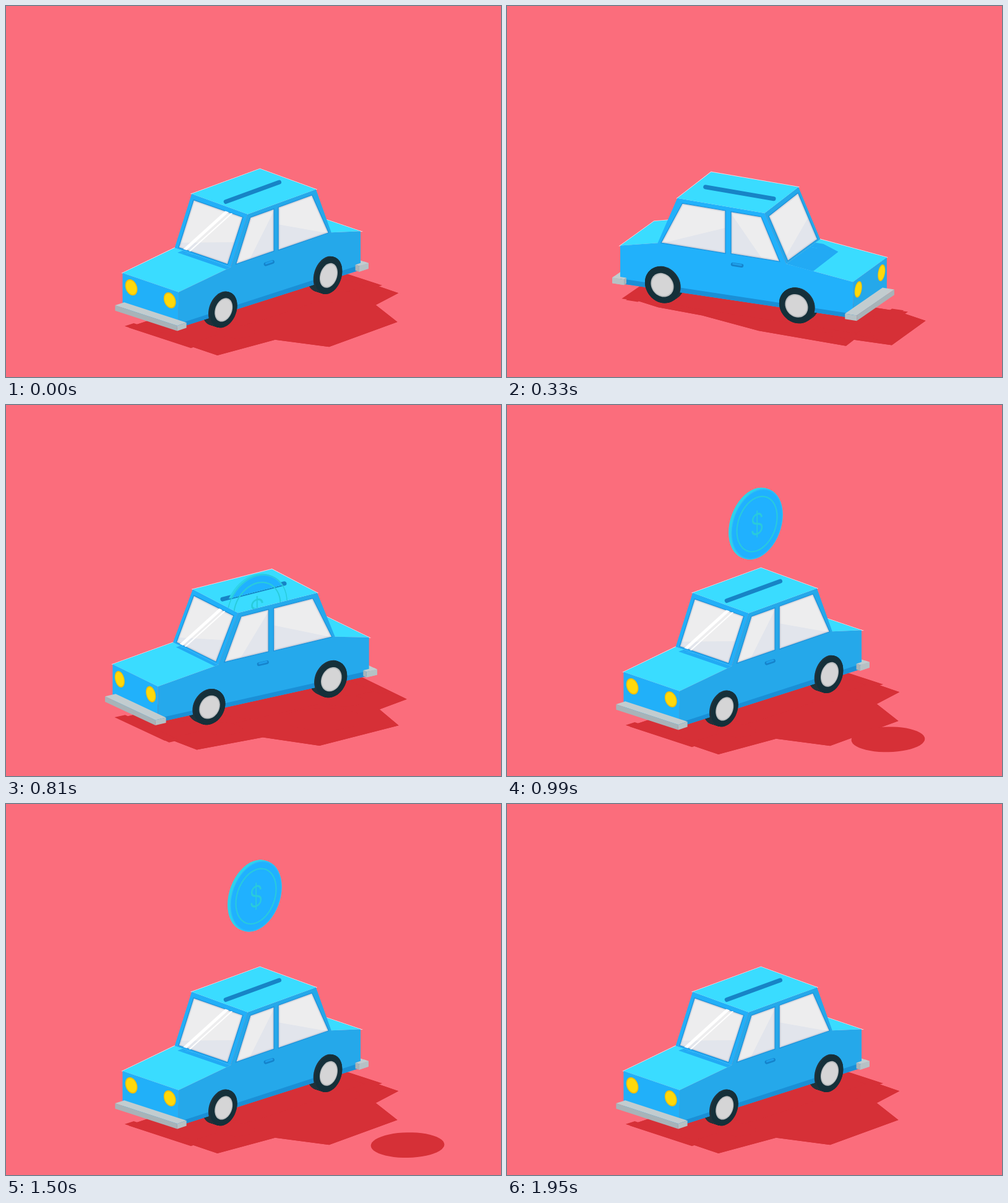
An HTML page with a canvas that plays this animation: 800 px wide and 600 px high, repeating every 1.98 s.

```html
<!DOCTYPE html>
<html>
<head>
<meta charset="utf-8">
<style>
html, body { margin: 0; width: 100%; height: 100%; overflow: hidden; background: #fb6d7c; }
canvas { display: block; }
</style>
</head>
<body>
<canvas id="stage" width="800" height="600"></canvas>
<script>
const g = document.getElementById('stage').getContext('2d');
const LOOP = 1980, STEP = 30, RISE = .937;
const GROUND = 172, HALF = 64, DARK = '#d63037', TEAL = '#29cbdc';

// Car outline from the side: [position along the car, drop below the roof]
const outline = [[219, 151], [219, 90], [100, 78], [61, 0], [-95, 0], [-130, 78], [-197, 92], [-197, 153]];
const [FRONT, HOOD, SHIELD, ROOF, BACK, TRUNK, REAR] = [0, 1, 2, 3, 4, 5, 6];
const sideWindows = [
  [[1, 7], [55, 7], [88, 76], [1, 76]],
  [[-9, 7], [-86, 7], [-124, 77], [-9, 77]]
];
let cos, sin, near;

const clamp = v => Math.max(0, Math.min(1, v));
const lerp = (a, b, k) => a + (b - a) * k;

// Level lines look a little flatter towards the ground
const tilt = d => .365 - .00026 * Math.max(0, d);

// x runs to the front, y across, d downwards from the roof in screen pixels
const project = ([x, y, d]) => [
  388.5 + x * cos + y * sin,
  304.4 + tilt(d) * (x * sin - y * cos) + d
];
const castOn = level => p => {
  const [x, y] = project(p), h = level - p[2];
  return [x + .765 * h, y + 1.248 * h];
};

function trace(points, map = project) {
  g.beginPath();
  points.forEach(p => g.lineTo(...map(p)));
  g.closePath();
}
function fill(points, color, map) {
  trace(points, map);
  g.fillStyle = color;
  g.fill();
}
function outlineOf(points, color, width) {
  trace(points);
  g.strokeStyle = color;
  g.lineWidth = width;
  g.stroke();
}
function line(points, color, width, map = project) {
  g.beginPath();
  points.forEach(p => g.lineTo(...map(p)));
  g.strokeStyle = color;
  g.lineWidth = width;
  g.lineCap = 'round';
  g.stroke();
}
function clipped(points, draw) {
  g.save();
  trace(points);
  g.clip();
  draw();
  g.restore();
}
const circle = (r, place) => Array.from({ length: 48 }, (_, i) => {
  const a = i * Math.PI / 24;
  return place(r * Math.cos(a), r * RISE * Math.sin(a));
});
const disc = (x, y, d, r) => circle(r, (a, b) => [x + a, y, d + b]);

function strip(i) {
  const [a, b] = outline[i], [c, d] = outline[(i + 1) % 8];
  return [[a, -HALF, b], [a, HALF, b], [c, HALF, d], [c, -HALF, d]];
}
const side = (y, pts = outline) => pts.map(([x, d]) => [x, y, d]);
function facing(quad) {
  const [a, b, c] = quad.map(project);
  return (b[0] - a[0]) * (c[1] - b[1]) < (b[1] - a[1]) * (c[0] - b[0]);
}
function blue(nx) {
  const k = clamp((nx + .7) / 1.4);
  return `rgb(${lerp(32, 37, k)},${lerp(179, 168, k)},${lerp(255, 234, k)})`;
}

function box(x0, x1, y0, y1, d0, d1) {
  const x = sin > 0 ? x1 : x0, y = near > 0 ? y1 : y0;
  fill([[x0, y0, d0], [x1, y0, d0], [x1, y1, d0], [x0, y1, d0]], '#c2cccf');
  fill([[x, y0, d0], [x, y1, d0], [x, y1, d1], [x, y0, d1]], '#a8b3b8');
  fill([[x0, y, d0], [x1, y, d0], [x1, y, d1], [x0, y, d1]], '#b6c1c5');
}
const bumperSpan = end => end > 0 ? [208, 229] : [-208, -187];
const bumper = end => box(...bumperSpan(end), -71, 71, 143, 152);
function bumperTip(end) {
  box(...bumperSpan(end), near > 0 ? 62 : -71, near > 0 ? 71 : -62, 143, 152);
}

function carShadow() {
  const map = castOn(GROUND);
  for (let i = 0; i < 8; i++) fill(strip(i), DARK, map);
  for (const y of [-HALF, HALF]) {
    fill(side(y), DARK, map);
    for (const x of [-120, 120]) fill(disc(x, y, 143, 31), DARK, map);
  }
  for (const end of [-1, 1]) {
    const [a, b] = bumperSpan(end);
    for (const d of [143, 152])
      fill([[a, -71, d], [a, 71, d], [b, 71, d], [b, -71, d]], DARK, map);
  }
}

// The cabin darkens whichever deck lies to its right
function deck(i, level) {
  const map = castOn(level), quad = strip(i);
  fill(quad, '#3adcff');
  clipped(quad, () => {
    for (const j of [SHIELD, ROOF, BACK]) fill(strip(j), '#22aaf4', map);
    for (const y of [-HALF, HALF]) fill(side(y, outline.slice(2, 6)), '#22aaf4', map);
  });
}

function pane(points, facet) {
  fill(points, '#ededee');
  clipped(points, () => {
    fill(facet, '#e2e5ec');
    outlineOf(points, 'rgba(150,160,180,.25)', 5);
  });
  outlineOf(points, '#1b8fd9', 1.2);
}

function screen(i) {
  const quad = strip(i);
  if (!facing(quad)) return;
  const [top, low] = i === SHIELD ? [outline[3], outline[2]] : [outline[4], outline[5]];
  const at = (y, t) => [lerp(top[0], low[0], t), y, lerp(top[1], low[1], t)];
  const glass = [at(-56, .09), at(56, .08), at(56, .97), at(-56, .97)];
  fill(quad, blue((i === SHIELD ? cos : -cos) + .5));
  pane(glass, [at(-56, .88), at(56, .55), at(56, 1), at(-56, 1)]);
  if (i === SHIELD && cos < 0) clipped(glass, () => {
    line([at(22, .05), at(-44, 1)], '#fff', 5);
    line([at(33, .05), at(-33, 1)], '#fff', 2);
  });
}

function ends() {
  const front = strip(FRONT), rear = strip(REAR);
  if (facing(front)) {
    fill(front, blue(cos + .4));
    for (const y of [-44, 44]) {
      const lamp = r => circle(r, (a, b) => [219, y + a, 109 + b]);
      fill(lamp(14), '#f3bd08');
      fill(lamp(12), '#ffd90a');
    }
  }
  if (facing(rear)) {
    fill(rear, blue(-cos));
    for (const y of [-44, 44]) {
      const lamp = (w, h) => [[-197, y - w, 101 - h], [-197, y + w, 101 - h], [-197, y + w, 101 + h], [-197, y - w, 101 + h]];
      fill(lamp(14, 8), '#a92a4c');
      fill(lamp(12.5, 6.5), '#ee2b42');
    }
  }
}

function nearSide() {
  const y = HALF * near;
  fill(side(y), blue(sin * near));
  fill(side(y, [[219, 144], [219, 151], [-197, 153], [-197, 145]]), '#1a8fd6');
  sideWindows.forEach((w, i) =>
    pane(side(y, w), side(y, i ? [[-9, 35], [-130, 80], [-9, 80]] : [[1, 10], [60, 80], [1, 80]])));
  line(side(y, [[4, 93], [20, 93]]), '#1583cb', 6);
  line(side(y, [[5, 92], [19, 92]]), '#1f9fea', 3);
}

function wheels(from, to) {
  for (const x of [-120, 120])
    for (let y = from; y <= to; y++) fill(disc(x, y * near, 143.5, 31), '#21323b');
}
function hubs() {
  for (const x of [-120, 120]) {
    fill(disc(x, 68 * near, 143.5, 31), '#15303a');
    fill(disc(x, 68 * near, 143.5, 20.5), '#b9bcbe');
    fill(disc(x, 68 * near, 143.5, 18.5), '#d5d5d6');
  }
}

function car() {
  const back = sin > 0 ? -1 : 1;
  wheels(50, 64);
  bumper(back);
  for (const i of [HOOD, ROOF, TRUNK]) outlineOf(strip(i), '#ffd3dd', 1.6);
  deck(HOOD, 84);
  deck(TRUNK, 92);
  ends();
  screen(SHIELD);
  screen(BACK);
  nearSide();
  fill(strip(ROOF), '#3adcff');
  line([[47, 0, 0], [-75, 0, 0]], '#1784c6', 7);
  wheels(64, 68);
  hubs();
  bumperTip(back);
  bumper(-back);
}

function coinDrop(t) {
  const u = (t - 1320) / 100, q = u * u;
  return -163 + 3.4 * q + (u < 0 ? .154 : .09) * q * q;
}

function coinMarks(d) {
  const [x, y] = project([-19, 3, d]);
  outlineOf(disc(-19, 3, d, 46), TEAL, 2);
  g.save();
  g.transform(-cos, -sin * tilt(d), 0, RISE, x, y);
  g.font = '300 50px Inter, sans-serif';
  g.textAlign = 'center';
  g.fillStyle = TEAL;
  g.fillText('$', 0, 18);
  g.restore();
}

function coin(d) {
  // Only the part above the slot shows
  const above = [[300, 3, 0], [-300, 3, 0], [-300, 3, -700], [300, 3, -700]];
  clipped(above, () => {
    for (let y = -3; y < 3; y += .5) fill(disc(-19, y, d, 59), '#2fd3ea');
    fill(disc(-19, 3, d, 59), '#2bbdf8');
    fill(disc(-19, 3, d, 57), '#20b1ff');
    coinMarks(d);
  });
  // Its thin lines still shine through the roof
  clipped(strip(ROOF), () => {
    outlineOf(disc(-19, 3, d, 59), TEAL, 1.5);
    coinMarks(d);
  });
}

function rays(t) {
  const reach = (start, span) => 55 + 93 * (1 - (1 - clamp((t - start) / span)) ** 2);
  const outer = reach(1105, 185), inner = reach(1150, 240);
  if (outer - inner < 1) return;
  for (let i = 0; i < 6; i++) {
    const a = Math.PI / 6 + i * Math.PI / 3;
    const at = r => [
      397.5 - r * Math.cos(a) * cos,
      143.5 - r * (Math.cos(a) * sin * tilt(0) + Math.sin(a) * RISE)
    ];
    line([at(inner), at(outer)], '#fffdfd', 8.5, p => p);
  }
}

function draw(now) {
  const t = Math.floor(now % LOOP / STEP) * STEP;
  const k = clamp(t / 900), turn = (135 - 360 * k * k * (3 - 2 * k)) * Math.PI / 180;
  cos = Math.cos(turn);
  sin = Math.sin(turn);
  near = cos < 0 ? 1 : -1;
  g.fillStyle = '#fb6d7c';
  g.fillRect(0, 0, 800, 600);
  const d = coinDrop(t), out = d < 58;
  carShadow();
  if (out) fill(disc(-19, 0, d, 59), DARK, castOn(GROUND));
  car();
  rays(t);
  if (out) coin(d);
}

const start = performance.now();
(function tick() {
  draw(performance.now() - start);
  requestAnimationFrame(tick);
})();
</script>
</body>
</html>
```
